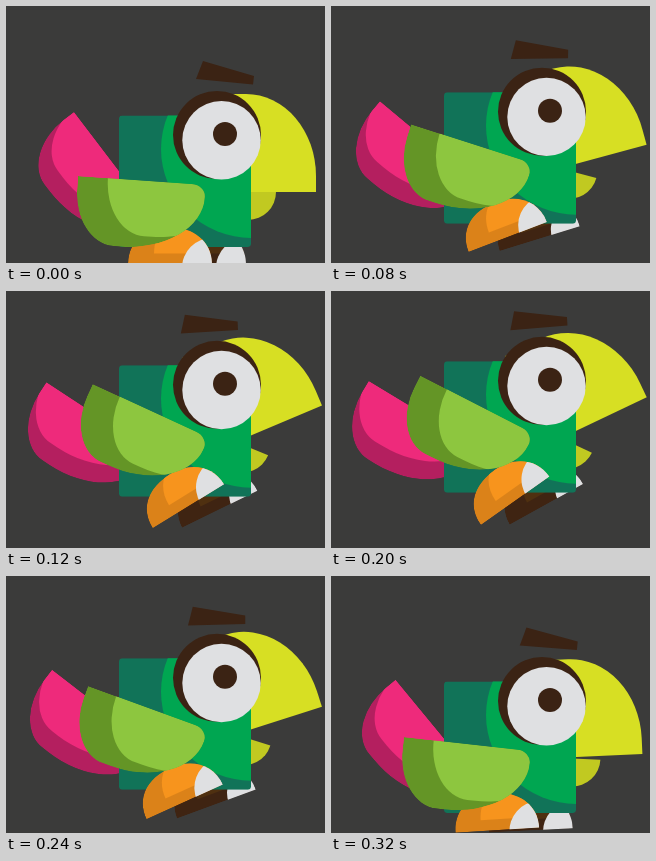
Write an HTML page that moves like this. It is 319 px wide and 257 px high and loops after 360 ms.

```html
<!DOCTYPE html>
<html lang="en">
<head>
<meta charset="utf-8">
<title>Flapping parrot</title>
<style>
  @property --lift { syntax: "<number>"; inherits: true; initial-value: 0; }
  @property --frown { syntax: "<number>"; inherits: true; initial-value: 0; }

  html, body { margin: 0; width: 100%; height: 100%; overflow: hidden; background: #3b3b3a; }
  svg { display: block; width: 100%; height: 100%; }

  /* Eased flight up and down, held at 25 pictures per second */
  @keyframes flap {
    0%     { --lift: 0;    --frown: 0; }
    11.11% { --lift: 4.6;  --frown: 2.1; }
    22.22% { --lift: 23.3; --frown: 10.8; }
    33.33% { --lift: 35.2; --frown: 16.2; }
    44.44% { --lift: 39;   --frown: 17.5; }
    55.56% { --lift: 39.2; --frown: 11.8; }
    66.67% { --lift: 27.2; --frown: 8.7; }
    77.78% { --lift: 11;   --frown: 3.5; }
    88.89% { --lift: 4;    --frown: 1.3; }
    100%   { --lift: 0;    --frown: 0; }
  }
  .bird {
    animation: flap 360ms step-end infinite;
    transform: translateY(calc(var(--lift) * -1px));
  }
  .joint { transform: rotate(calc(var(--rest, 0deg) + var(--lift) * var(--swing))); }
  .tail  { --swing: -.55deg; transform-origin: 114px 197px; }
  .wing  { --swing: .59deg; --rest: 4deg; transform-origin: 193.5px 189px; }
  .upper { --swing: -.65deg; transform-origin: 223px 153px; }
  .lower { --swing: .64deg; transform-origin: 232px 173px; }
  .near  { --swing: -.9deg; transform-origin: 159px 222px; }
  .far   { --swing: -.74deg; transform-origin: 195px 222px; }
  .brow {
    transform-origin: 220.5px 69px;
    transform: translateX(calc(var(--frown) * -1px)) rotate(calc(var(--lift) * -.26deg));
  }
</style>
</head>
<body>
<svg viewBox="0 0 319 257" preserveAspectRatio="none">
  <defs>
    <path id="feather" d="M0 0H114A14 12.5 0 0 1 128 12.5A80 55 0 0 1 48 67.5H40A40 55 0 0 1 0 12.5Z"/>
    <path id="foot" d="M122 258.5C122 235 139 221.5 165 221.5C188 221.5 206 236 206 258.5Z"/>
    <rect id="body" x="113" y="109.5" width="132" height="131.5" rx="3"/>
    <clipPath id="inFeather"><use href="#feather"/></clipPath>
    <clipPath id="inFoot"><use href="#foot"/></clipPath>
    <clipPath id="inBody"><use href="#body"/></clipPath>
  </defs>

  <rect width="319" height="257" fill="#3b3b3a"/>

  <g class="bird">
    <g class="joint tail">
      <g transform="translate(68 106) rotate(52.7)" clip-path="url(#inFeather)">
        <use href="#feather" fill="#b41f5f"/>
        <use href="#feather" x="-3" y="-19" fill="#ee2a7b"/>
      </g>
    </g>

    <path class="joint lower" d="M214 186H270A28 28 0 0 1 214 186Z" fill="#c1c921"/>
    <path class="joint upper" d="M200 186V88H240A70 82 0 0 1 310 170V186Z" fill="#d7df23"/>

    <g class="joint far">
      <g transform="translate(34 0)" clip-path="url(#inFoot)">
        <use href="#foot" fill="#3f2412"/>
        <use href="#foot" x="26" y="-11" fill="#4f3010"/>
        <circle cx="206" cy="262" r="30" fill="#dfe0e2"/>
      </g>
    </g>

    <g clip-path="url(#inBody)">
      <use href="#body" fill="#117358"/>
      <ellipse cx="246" cy="143" rx="91" ry="89" fill="#00a651"/>
    </g>

    <g class="joint near">
      <g clip-path="url(#inFoot)">
        <use href="#foot" fill="#db8219"/>
        <use href="#foot" x="26" y="-11" fill="#f7941d"/>
        <circle cx="206" cy="262" r="30" fill="#dfe0e2"/>
      </g>
    </g>

    <g class="joint wing">
      <g transform="translate(71 178.5)" clip-path="url(#inFeather)">
        <use href="#feather" fill="#649526"/>
        <use href="#feather" x="30" y="-12" fill="#8dc63f"/>
      </g>
    </g>

    <circle cx="211" cy="129" r="44" fill="#3b2314"/>
    <circle cx="215.5" cy="134.2" r="39.2" fill="#dfe0e2"/>
    <circle cx="219" cy="128" r="12" fill="#3b2314"/>
    <path class="brow" d="M197 55L248 70L247 78.5L190 73Z" fill="#3b2314"/>
  </g>
</svg>
</body>
</html>
```
